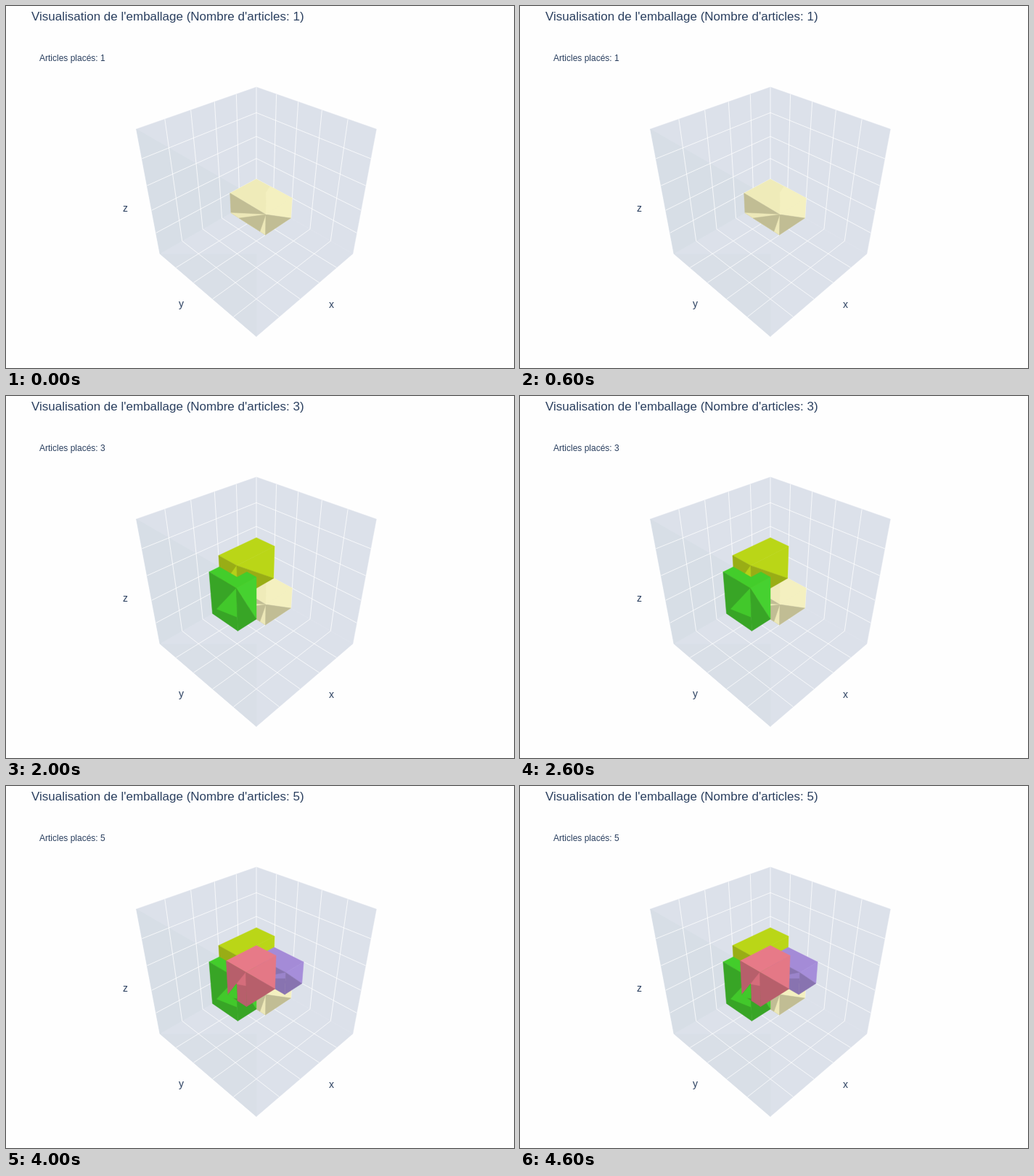
Write an HTML page with a canvas that moves like this. It is 700 by 500 pixels and loops after 5000 ms.

```html
<!DOCTYPE html>
<html lang="fr">
<head>
<meta charset="utf-8">
<style>
  html, body { margin: 0; width: 100%; height: 100%; overflow: hidden; background: #fefefe; }
  canvas { display: block; }
</style>
</head>
<body>
<canvas id="stage" width="700" height="500"></canvas>
<script>
const ctx = document.getElementById('stage').getContext('2d');
const SIZE = 10, STEP_MS = 1000;

// Boxes: near corner, far corner, colours; tip and drop shape the lit part of the left face.
const yellow = { from: [0, 0, 0], to: [3, 4, 2], top: '#efebb9', lit: '#f4f0c0', dark: '#c1bd94', glow: '#ede8b8', tip: 1, drop: 1 };
const green = { from: [3, 0, 0], to: [5, 3, 4], top: '#43cd2b', lit: '#46d130', dark: '#38a526', glow: '#42c82b', tip: .8, drop: .66 };
const olive = { from: [0, 0, 2], to: [4, 2, 5], top: '#bad617', lit: '#bad617', dark: '#99ad15', glow: '#b5d018', tip: .5, drop: .5 };
const purple = { from: [0, 2, 2], to: [2, 5, 4], top: '#a48bd7', lit: '#a68eda', dark: '#8873b0', glow: '#9b84cb', tip: 1, drop: .25 };
const red = { from: [2, 2, 2], to: [5, 4, 5], top: '#e77a88', lit: '#e47886', dark: '#b75f6b', glow: '#d56d7b', tip: .5, drop: .38 };

// Perspective view along the cube's diagonal.
function project(point) {
  const [x, y, z] = point.map(v => v * 2 / SIZE - 1);
  const depth = 1 - .1089 * (x + y + z);
  return [345 + 73.68 * (y - x) / depth, 265.5 - 42.54 * (2 * z - x - y) / depth];
}

function trace(points) {
  ctx.beginPath();
  points.forEach(p => ctx.lineTo(...project(p)));
}

function face(color, ...points) {
  trace(points);
  ctx.closePath();
  ctx.fillStyle = ctx.strokeStyle = color;
  ctx.lineWidth = .5;
  ctx.fill();
  ctx.stroke();
}

function line(...points) {
  trace(points);
  ctx.strokeStyle = 'rgba(255,255,255,.75)';
  ctx.lineWidth = 1;
  ctx.stroke();
}

const mix = (a, b, t) => a.map((v, i) => v + (b[i] - v) * t);

function drawRoom() {
  const s = SIZE, wall = '#dce1ea', shade = '#d7dee6';
  face(wall, [0, 0, 0], [s, 0, 0], [s, 0, s], [0, 0, s]);
  face(wall, [0, 0, 0], [0, s, 0], [0, s, s], [0, 0, s]);
  face(wall, [0, 0, 0], [s, 0, 0], [s, s, 0], [0, s, 0]);
  face(shade, [s, 0, s], [s, 0, 0], [0, 0, 0]);
  face('#d9dfe7', [s, 0, 0], [s, s, 0], [5, 5, 0]);
  line([0, 0, 0], [0, 0, s]);
  for (let t = 2; t < s; t += 2) {
    line([t, 0, s], [t, 0, 0], [t, s, 0]);
    line([0, t, s], [0, t, 0], [s, t, 0]);
    line([s, 0, t], [0, 0, t], [0, s, t]);
  }
}

function drawBox({ from, to, top, lit, dark, glow, tip, drop }, outline) {
  const [x0, y0, z0] = from, [x1, y1, z1] = to;
  const front = [x1, y1, z1], foot = [x1, y1, z0];
  const left = [x1, y0, z1], leftFoot = [x1, y0, z0];
  const right = [x0, y1, z1], rightFoot = [x0, y1, z0];
  face(top, ...(outline || [[x0, y0, z1], left, front, right]));
  face(dark, left, front, foot, leftFoot);
  face(glow, front, mix(front, leftFoot, tip), mix(front, foot, drop));
  face(lit, front, right, rightFoot);
  face(dark, front, rightFoot, foot);
}

function drawScene(count) {
  ctx.clearRect(0, 0, 700, 500);
  drawRoom();

  drawBox(yellow);
  face(yellow.lit, [0, 1.6, 2], [.9, 2, 2], [1.9, 3, 2], [3, 4, 2], [0, 4, 2]);
  face(yellow.dark, [3, 4, 2], [3, 1, 0], [3, 3.4, 0]);

  if (count > 2) drawBox(olive);
  if (count > 3) drawBox(purple);
  // The olive box rises through the green top and leaves an L.
  const notched = [[5, 0, 4], [4, 0, 4], [4, 2, 4], [3, 2, 4], [3, 3, 4], [5, 3, 4]];
  if (count > 1) drawBox(green, count > 2 && notched);
  if (count > 4) {
    drawBox(red);
    // Green shows through where both fronts share a plane.
    face(green.dark, [5, 2, 2], [5, 3, 3.5], [5, 3, 2]);
    face(green.glow, [5, 2, 2], [5, 3, 3.5], [5, 3, 2.2], [5, 2.2, 1.8]);
  }

  text(`Visualisation de l'emballage (Nombre d'articles: ${count})`, 35, 20, 17);
  text(`Articles placés: ${count}`, 46, 76, 12);
  text('x', 445, 417, 14);
  text('y', 238, 416, 14);
  text('z', 161, 284, 14);
}

function text(label, x, y, size) {
  ctx.font = `${size}px "Liberation Sans", Arial, sans-serif`;
  ctx.fillStyle = '#2a3f5f';
  ctx.fillText(label, x, y);
}

const start = performance.now();
function tick() {
  const elapsed = performance.now() - start;
  drawScene(Math.floor(elapsed / STEP_MS) % 5 + 1);
  requestAnimationFrame(tick);
}
tick();
</script>
</body>
</html>
```
